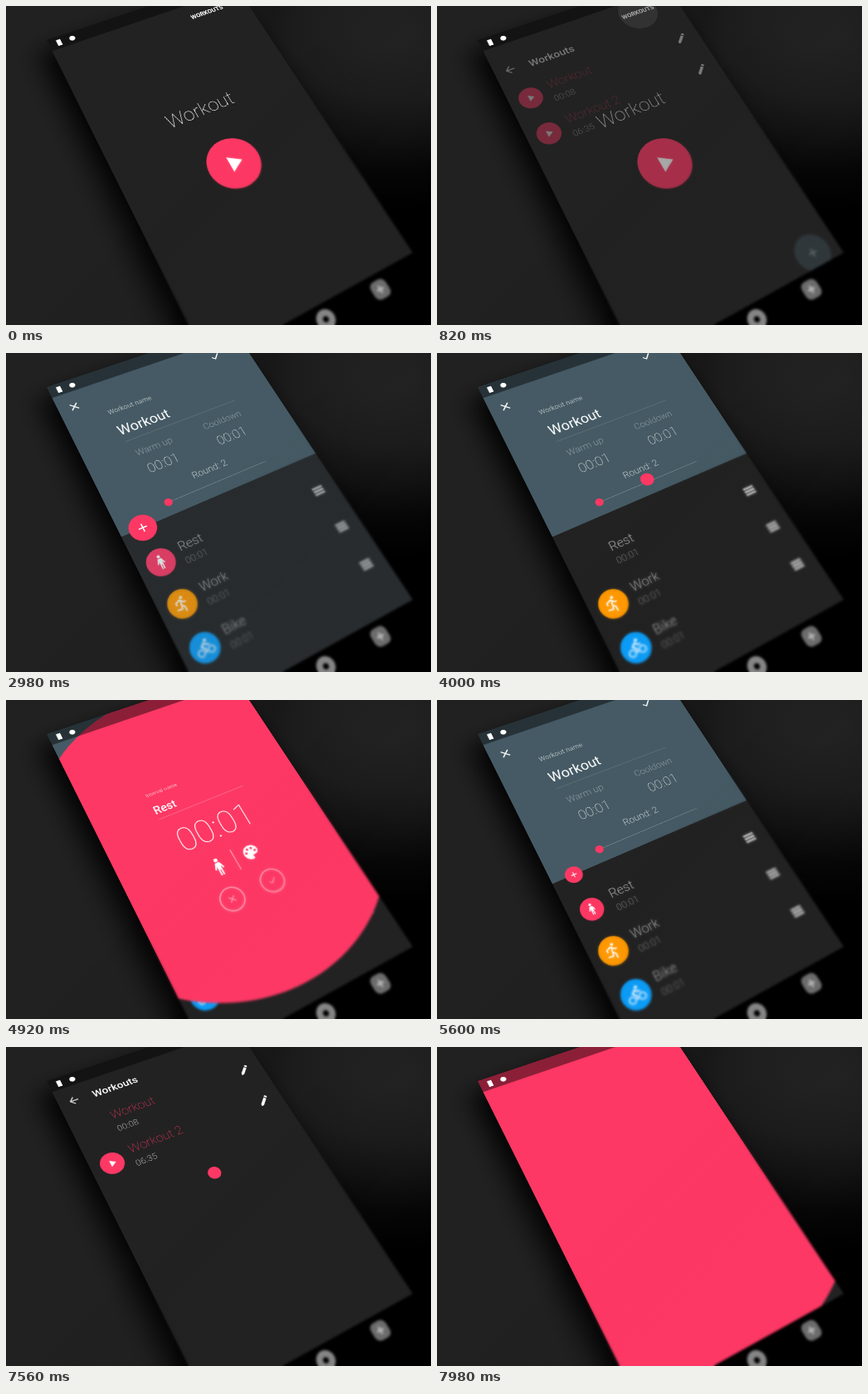
Animation, 512 px wide and 384 px high, one loop 8 s. Source, as an HTML page:

```html
<!DOCTYPE html>
<html lang="en">
<head>
<meta charset="utf-8">
<title>Workout timer</title>
<style>
html, body { margin: 0; width: 100%; height: 100%; overflow: hidden; }
body {
  position: relative;
  background:
    linear-gradient(100deg, #212121 45%, transparent 56%),
    radial-gradient(ellipse 300px 215px at 460px 30px, #222 10%, #1c1c1c 38%, #121212 58%, #060606 78%, #000 100%);
}
#phone {
  position: absolute; left: 0; top: 0; width: 360px; height: 640px;
  background: #000; box-shadow: -20px 20px 42px 0 #000;
  transform-origin: 0 0;
  transform: matrix3d(.6983,-.2155,0,.0003014, .2507,.5213,0,-.0003252, 0,0,1,0, 49,41,0,1);
}
svg { display: block; font-family: Roboto, sans-serif; }
/* depth of field towards the bottom right */
#lens {
  position: absolute; inset: 0;
  backdrop-filter: blur(1.7px);
  -webkit-mask-image: linear-gradient(135deg, transparent 47%, #000 68%);
  mask-image: linear-gradient(135deg, transparent 47%, #000 68%);
}
</style>
</head>
<body>
<div id="phone"></div>
<div id="lens"></div>
<script>
const PINK = '#fd3864', SLATE = '#455a64', DARK = '#222';
const LOOP = 8000, HUB = { x: 180, y: 277, r: 11 }, FULL = 363;
const REST = { x: 36.5, y: 367, r: 22.5 }, PLAY = { x: 35.5, y: 118.5, r: 19.8 };
const PENCIL = { x: 326, y: 112 };

// Markup helpers
const text = (x, y, size, weight, fill, str, anchor = 'start') =>
  `<text x="${x}" y="${y}" font-size="${size}" font-weight="${weight}" fill="${fill}" text-anchor="${anchor}">${str}</text>`;
const circle = (x, y, r, fill, more = '') => `<circle cx="${x}" cy="${y}" r="${r}" fill="${fill}" ${more}/>`;
const rect = (x, y, w, h, fill, more = '') => `<rect x="${x}" y="${y}" width="${w}" height="${h}" fill="${fill}" ${more}/>`;
const stroke = (d, color = '#fff', width = 2) => `<path d="${d}" fill="none" stroke="${color}" stroke-width="${width}"/>`;
const fill = d => `<path d="${d}" fill="#fff"/>`;
const at = (x, y, body, scale = 1, id = '') =>
  `<g transform="translate(${x} ${y})"><g ${id && `id="${id}"`} transform="scale(${scale})">${body}</g></g>`;
const icon = (x, y, body, scale = 1) => at(x, y, `<g transform="translate(-12 -12)">${body}</g>`, scale);
const group = (id, body) => `<g id="${id}">${body}</g>`;

const man = circle(12, 3.8, 2.2, '#fff') +
  fill('M9.5 6.8h5l2.9 7.2-1.7.7-1.5-3.7V22h-1.7v-6.5h-1V22H9.8V11l-1.5 3.7-1.7-.7z');
const runner = circle(13.5, 3.5, 2, '#fff') +
  stroke('M4.5 12V8.5L9.7 6.3c1-.2 1.6.2 2.2 1.2 1 1.9 2.8 3.1 5.6 3.1M11.5 7.5 10 13.5l3.5 3V23M10.5 13.5 9 18.5 2.5 17.5');
const bike = circle(15.5, 3.5, 2, '#fff') +
  [5, 19].map(x => circle(x, 17, 4.2, 'none', 'stroke="#fff" stroke-width="1.6"')).join('') +
  stroke('M19.1 10c-2 0-3.7-.6-5-2l-1.8-1.8L8.2 9.8 12 13.5V19');
const palette = fill('M12 3a9 9 0 0 0 0 18c.8 0 1.5-.7 1.5-1.5 0-.9-.6-1.2-.6-2 0-.8.7-1.5 1.5-1.5H16a5 5 0 0 0 5-5c0-4.4-4-8-9-8z') +
  [[6.5, 11.5], [9.5, 7.5], [14.5, 7.5], [17.5, 11.5]].map(([x, y]) => circle(x, y, 1.5, PINK)).join('');
const pencil = fill('M3 17.2V21h3.8L17.8 9.9l-3.7-3.7zM20.7 7a1 1 0 0 0 0-1.4l-2.3-2.3a1 1 0 0 0-1.4 0l-1.8 1.8 3.7 3.7z');
const triangle = fill('M-7-14V14L15 0z');
const cross = stroke('M-6-6 6 6M6-6-6 6');
const check = stroke('M-7 0-2 5 7-5');
const plus = size => stroke(`M${-size} 0H${size}M0 ${-size}V${size}`);

const home = rect(0, 0, 360, 640, DARK) +
  circle(281, 53, 0, '#fff', 'id="tap" fill-opacity=".12"') +
  text(281, 57, 12, 700, '#fff', 'WORKOUTS', 'middle') +
  text(176, 240, 33.5, 100, '#fff', 'Workout', 'middle') +
  circle(180, 338, 44.5, PINK) + at(180, 338, triangle);

const listRow = (y, name, time, n) =>
  at(PLAY.x, y, circle(0, 0, PLAY.r, PINK) + `<g transform="scale(.43)">${triangle}</g>`, 1, 'play' + n) +
  text(70, y - 4, 21.8, 100, PINK, name) + text(69.5, y + 22, 15.3, 300, '#aaa', time) +
  at(PENCIL.x, y - 6.5, `<g transform="translate(-12 -12)">${pencil}</g>`, 1, 'pencil' + n);

const list = rect(0, 0, 360, 640, DARK) +
  stroke('M34 54.5H20M27 47.5l-7 7 7 7', '#ddd', 1.8) + text(59.5, 62.5, 19.2, 500, '#fff', 'Workouts') +
  listRow(PLAY.y, 'Workout', '00:08', 1) + listRow(PLAY.y + 72, 'Workout 2', '06:35', 2) +
  at(315, 547.5, circle(0, 0, 29.5, SLATE) + `<g opacity=".8">${plus(7)}</g>`, 1, 'add');

const timeField = (x, label) =>
  text(x, 185, 16.5, 300, '#8b9aa1', label, 'middle') + text(x, 222, 23.5, 100, '#fff', '00:01', 'middle');

const header = at(27, 55, cross) + circle(298, 53, 0, '#fff', 'id="tick" fill-opacity=".2"') +
  at(298, 53, check) + [43, 50, 57].map(y => circle(335, y, 2, '#fff')).join('') +
  text(73, 93, 12.3, 400, '#a9b4b9', 'Workout name') + text(73, 138, 25, 400, '#fff', 'Workout') +
  stroke('M75 152H284', '#65777f', 1) +
  timeField(115, 'Warm up') + timeField(244, 'Cooldown') +
  text(179, 261, 16.5, 300, '#bcc6ca', 'Round: 2', 'middle') +
  stroke('M91 281.5H272', '#74858d', 1.2) + circle(91, 281.5, 6.7, PINK);

const interval = (i, name, color, art) => {
  const y = REST.y + 72 * i;
  return at(REST.x, y, circle(0, 0, REST.r, color) + icon(0, 0, art, 1.15), 1, 'step' + i) +
    text(71, y - 2.5, 20.5, 300, '#aaa', name) + text(71, y + 20, 15.5, 300, '#747474', '00:01') +
    [-5.5, 0, 5.5].map(d => rect(316.5, y + d - 2, 19, 4, '#bbb')).join('');
};

const editor = rect(0, 0, 360, 640, SLATE) +
  group('steps', rect(0, 304, 360, 340, DARK) + interval(0, 'Rest', PINK, man) +
    interval(1, 'Work', '#ff9800', runner) + interval(2, 'Bike', '#0c9bf5', bike)) +
  group('header', header) +
  at(36, 304, circle(0, 0, 22, PINK) + plus(7), 1, 'fab');

const button = (x, art) => `<g opacity=".6">${circle(x, 400, 19.5, 'none', 'stroke="#fff" stroke-width="2"') +
  at(x, 400, art, .75)}</g>`;
const form = text(100, 182, 9.4, 400, '#ffb3c3', 'Interval name') + text(100, 217, 19.5, 500, '#fff', 'Rest') +
  stroke('M101 227H259', '#ffffff55', 1) + text(179, 297, 58, 100, '#fff', '00:01', 'middle') +
  icon(150, 343, man, 1.5) + stroke('M180 324V362', '#ffffffb0', 1.3) + icon(209, 342, palette, 1.4) +
  button(143, cross) + button(216, check);

const nav = circle(181, 614.5, 9.5, 'none', 'stroke="#858585" stroke-width="10"') +
  rect(266, 601.5, 28, 28, '#6c6c6c', 'rx="9"') + at(280, 615.5, stroke('M-6 0H6M0-6V6', '#bbb', 3));

document.getElementById('phone').innerHTML = `
<svg width="360" height="640" viewBox="0 0 360 640">
  <clipPath id="screen"><rect width="360" height="592"/></clipPath>
  <g clip-path="url(#screen)">
    ${group('home', home)}${group('list', list)}
    ${circle(PENCIL.x, PENCIL.y, 0, SLATE, 'id="slate"')}
    ${group('editor', editor)}
    ${circle(0, 0, 0, PINK, 'id="dot"')}${group('form', form)}
    ${rect(0, 0, 360, 24.5, '#000', 'fill-opacity=".45"')}
    ${rect(13.5, 6.5, 7.5, 12.5, '#fff')}${circle(40.5, 13, 5, '#fff')}
  </g>
  ${nav}
</svg>`;

// Timing helpers
const part = (t, a, b) => Math.min(1, Math.max(0, (t - a) / (b - a)));
const ease = p => p * p * (3 - 2 * p);
const mix = (a, b, p) => a + (b - a) * p;
const $ = id => document.getElementById(id);
const set = (id, attrs) => { for (const k in attrs) $(id).setAttribute(k, attrs[k]); };
const fade = (id, p) => set(id, { opacity: p, display: p > 0 ? 'inline' : 'none' });
const scale = (id, s) => set(id, { transform: `scale(${s})` });
const slide = (id, p) => { fade(id, p ** 1.25); set(id, { transform: `translate(0 ${42 * (1 - p)})` }); };

const between = (a, b, p) => ({ x: mix(a.x, b.x, p), y: mix(a.y, b.y, p), r: mix(a.r, b.r, p) });

// A button travels to the hub, shrinking, then floods the screen.
function flood(t, start, from) {
  const spot = between(from, HUB, ease(part(t, start, start + 560)));
  spot.r += (FULL - HUB.r) * part(t, start + 560, start + 960) ** 1.2;
  return spot;
}

function drain(t) {
  const spot = between(HUB, { ...REST, r: HUB.r }, ease(part(t, 5240, 5440)));
  spot.r += (FULL - HUB.r) * (1 - part(t, 4640, 5240) ** 2);
  return spot;
}

function draw(t) {
  set('tap', { r: 36 * ease(part(t, 360, 680)) });
  fade('home', t < 980 ? 1 : 0);
  slide('list', part(t, 680, 980));

  const spin = t < 2400 ? ease(part(t, 1400, 1880)) : 0;
  set('pencil1', { transform: `rotate(${105 * spin})`, opacity: 1 - .8 * spin });
  set('slate', { r: t < 2660 ? 590 * ease(part(t, 2020, 2340)) : 0 });

  slide('editor', t < 2660 ? 0 : 1 - part(t, 6580, 6800));
  fade('steps', part(t, 2660, 3060));
  fade('header', part(t, 2660, 2920));
  const back = ease(part(t, 5460, 5700));
  scale('fab', t < 5460 ? ease(part(t, 2660, 2900)) * (1 - ease(part(t, 3440, 3640))) : back);
  scale('step0', t < 3440 ? 1 : t < 5440 ? 0 : mix(.5, 1, back));
  set('tick', { r: 30 * ease(part(t, 6020, 6300)) });

  scale('play1', t < 7040 ? 1 : 0);
  scale('add', 1 - ease(part(t, 7040, 7300)));

  const spot = t >= 7040 ? flood(t, 7040, PLAY)
    : t >= 4640 && t < 5440 ? drain(t)
    : t >= 3440 && t < 4640 ? flood(t, 3440, REST) : { x: 0, y: 0, r: 0 };
  set('dot', { cx: spot.x, cy: spot.y, r: spot.r });
  fade('form', part(t, 4260, 4400) * (1 - part(t, 5000, 5150)));
}

function tick() {
  draw(performance.now() % LOOP);
  requestAnimationFrame(tick);
}
tick();
</script>
</body>
</html>
```
